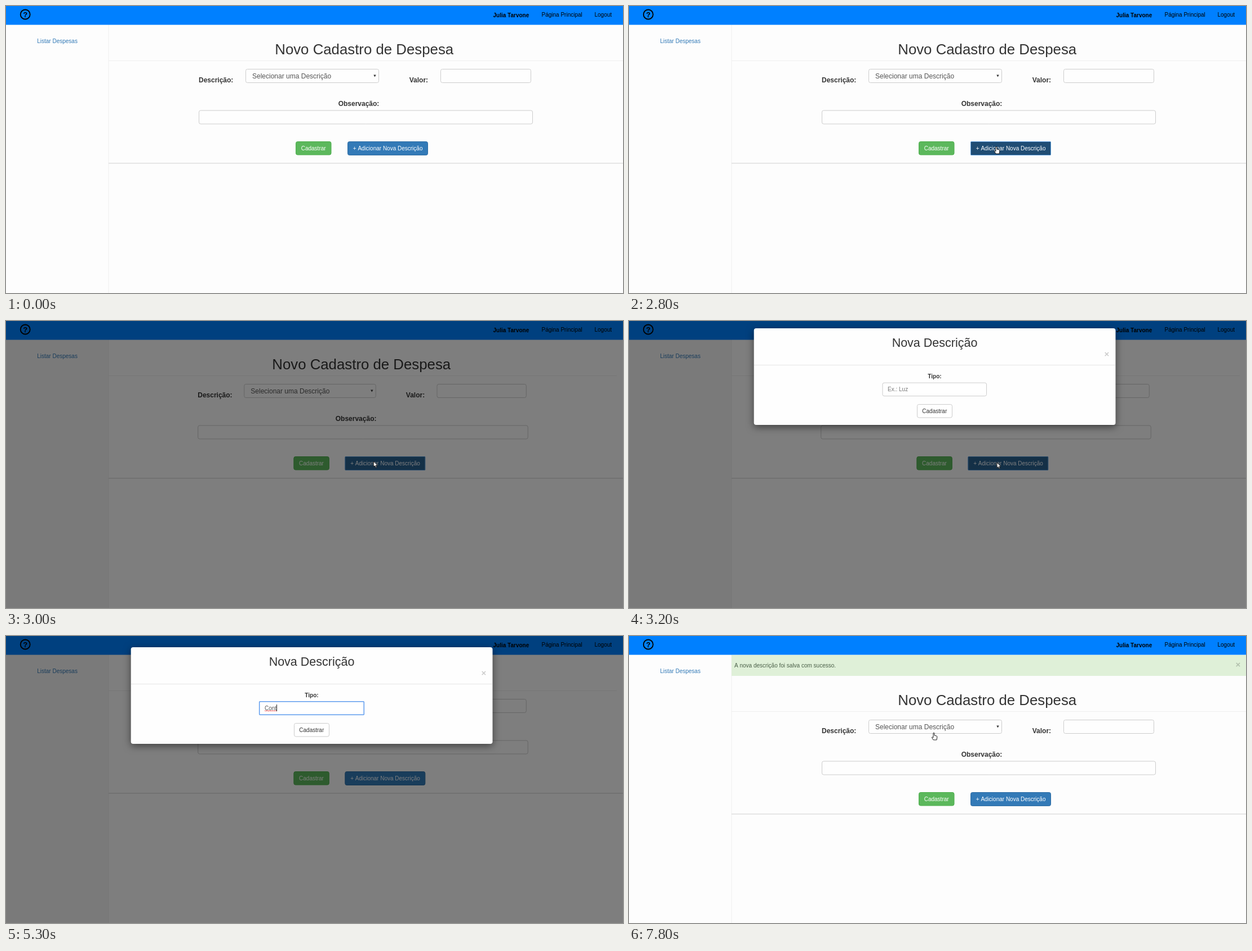
These frames come from a looping animation (1095x511 px, 8 s). An HTML page with a canvas:

```html
<!DOCTYPE html>
<html lang="pt-BR">
<head>
<meta charset="utf-8">
<title>Novo Cadastro de Despesa</title>
<style>
  html, body { margin: 0; width: 100%; height: 100%; overflow: hidden; background: #fdfdfd; }
  canvas { display: block; }
</style>
</head>
<body>
<canvas id="stage" width="1095" height="511"></canvas>
<script>
const W = 1095, H = 511, LOOP = 8000, STEP = 100;
const SIDE = 182;
const ctx = document.getElementById('stage').getContext('2d');
const SANS = '"Liberation Sans", Arial, sans-serif';

const ARROW = new Path2D('M0 0V9.5L2.2 7.5L3.8 11L5.3 10.3L3.8 7H6.8Z');
const HAND = new Path2D('M-1 1Q0-.7 1 1V5L5 6Q6 6.4 5.8 8L5 13H-.8L-3.7 8.6Q-3.4 7-1 8.8Z');

// Each run of the pointer: [time, x, y] points; it is hidden between runs.
const POINTER_RUNS = [
  { end: 1300, points: [[300, 56, 0], [700, 404, 116], [900, 404, 116], [1200, 541, 156]] },
  { end: 3600, points: [[1700, 545, 229], [2000, 652, 250], [2800, 652, 250], [2900, 652, 248],
                        [3100, 653, 252], [3200, 653, 252], [3500, 590, 145]] },
  { end: LOOP, points: [[6400, 541, 143], [6500, 545, 160], [6600, 545, 160], [6700, 541, 172]] }
];
const TYPED = [[4300, 'C'], [4700, 'Co'], [4900, 'Con'], [5300, 'Cont'], [5800, 'Conta']];

const clamp = v => Math.max(0, Math.min(1, v));
const between = (t, a, b) => t >= a && t < b;

function text(str, x, y, { size = 10, color = '#333', bold = false, align = 'left', family = SANS } = {}) {
  ctx.font = `${bold ? 'bold ' : ''}${size}px ${family}`;
  ctx.fillStyle = color;
  ctx.textAlign = align;
  ctx.fillText(str, x, y);
}

function rect(x, y, w, h, color) {
  ctx.fillStyle = color;
  ctx.fillRect(x, y, w, h);
}

function box(x, y, w, h, fill, border, radius = 3, line = 1) {
  ctx.beginPath();
  ctx.roundRect(x, y, w, h, radius);
  ctx.fillStyle = fill;
  ctx.fill();
  ctx.strokeStyle = border;
  ctx.lineWidth = line;
  ctx.stroke();
}

const field = (left, right, y) => box(left, y, right - left, 24, '#fefefe', '#ccc');
const closeMark = (x, y, color) => text('×', x, y, { size: 15, bold: true, color, align: 'center' });

function drawNav() {
  rect(0, 0, W, 33.5, '#0080ff');
  ctx.beginPath();
  ctx.arc(34.2, 15, 8.5, 0, Math.PI * 2);
  ctx.strokeStyle = '#000';
  ctx.lineWidth = 1.8;
  ctx.stroke();
  const color = '#000';
  text('?', 34.2, 19.5, { size: 13, bold: true, align: 'center', color });
  text('Julia Tarvone', 864.5, 20, { bold: true, color });
  text('Página Principal', 950.5, 19, { color });
  text('Logout', 1044.5, 19, { color });
}

function drawForm(t, narrow) {
  // The open dialog reserves scrollbar room, which squeezes the form.
  const X = x => narrow ? SIDE + (x - SIDE) * 0.989 : x;
  const label = { size: 12, bold: true };

  text('Novo Cadastro de Despesa', X(635.7), 85.5, { size: 25.8, align: 'center' });
  rect(SIDE, 97, (narrow ? 1084 : W) - SIDE, 1, '#eee');

  text('Descrição:', X(342), 135.5, label);
  field(X(425.5), X(661.5), 112.5);
  text('Selecionar uma Descrição', X(425.5) + 11.5, 128.5, { size: 12, color: '#555' });
  const tip = X(654.5);
  ctx.fillStyle = '#333';
  ctx.beginPath();
  ctx.moveTo(tip - 2.2, 122.5);
  ctx.lineTo(tip + 2.2, 122.5);
  ctx.lineTo(tip, 126.5);
  ctx.fill();

  text('Valor:', X(715.7), 135.5, label);
  field(X(771.5), X(931.5), 112.5);
  text('Observação:', X(626), 177.5, { ...label, align: 'center' });
  field(X(342.5), X(934.5), 186);

  const green = X(514.5), blue = X(606.5), white = { color: '#fff' };
  box(green, 241.5, 62.5, 23.5, '#5cb85c', '#4cae4c');
  text('Cadastrar', green + 9.2, 256.5, white);

  const focused = between(t, 2800, 3400);
  const pressed = between(t, 2800, 2900);
  const hovered = between(t, 1900, 3400);
  const fill = pressed ? '#204d74' : hovered ? '#286090' : '#337ab7';
  box(blue, 241.5, 142, 24, fill, focused ? '#5b9ddd' : hovered ? '#204d74' : '#2e6da4', focused ? 1 : 3);
  text('+ Adicionar Nova Descrição', blue + 9.3, 257, white);

  rect(SIDE, 279.3, W - SIDE, 1.4, '#ddd');
}

function drawPage(t, narrow, saved) {
  rect(0, 0, W, H, '#fdfdfd');
  if (narrow) rect(0, 33, SIDE, H, '#f5f5f5');
  rect(SIDE - 0.5, 33, 1, H, '#f0f0f0');
  drawNav();
  text('Listar Despesas', 55.2, 65.5, { color: '#337ab7' });
  ctx.save();
  if (saved) {
    rect(SIDE, 34, W - SIDE, 37, '#dff0d8');
    text('A nova descrição foi salva com sucesso.', 187, 56, { color: '#4a5f48' });
    closeMark(1081, 55.5, '#b2c0ad');
    ctx.translate(0, 37);
  }
  drawForm(t, narrow);
  ctx.restore();
}

function drawInput(t) {
  const focused = between(t, 3800, 6900);
  if (focused) box(449.7, 116.7, 185.6, 23.6, '#fff', '#5e9cee', 1, 1.5);
  else box(450, 117, 184.5, 23.5, '#fff', '#ccc');

  const typed = TYPED.reduce((last, [at, str]) => t >= at ? str : last, '');
  text(typed || 'Ex.: Luz', 459, 131.5, { color: typed ? '#555' : '#777' });

  const end = 459 + ctx.measureText(typed).width;
  if (between(t, 4400, 6300)) rect(Math.round(end), 122, 1, 12, '#222');
  if (typed === 'Cont') {
    ctx.beginPath();
    for (let x = 459, i = 0; x <= end; x += 1.4, i++) ctx.lineTo(x, i % 2 ? 134 : 132.6);
    ctx.strokeStyle = '#e33';
    ctx.lineWidth = 0.9;
    ctx.stroke();
  }
}

function drawModal(t) {
  const slide = clamp((t - 3000) / 300);
  ctx.save();
  ctx.globalAlpha = clamp((t - 3000) / 150);
  ctx.translate(0, -45 * (1 - slide) ** 1.7);

  ctx.save();
  ctx.shadowColor = 'rgba(0,0,0,.5)';
  ctx.shadowBlur = 14;
  ctx.shadowOffsetY = 3.6;
  ctx.fillStyle = '#fefefe';
  ctx.beginPath();
  ctx.roundRect(221.7, 20, 641.8, 172, 4);
  ctx.fill();
  ctx.restore();

  text('Nova Descrição', 542.5, 53, { size: 21.5, align: 'center' });
  closeMark(848, 71, '#ccc');
  rect(222, 85, 641, 1, '#e5e5e5');
  text('Tipo:', 542.5, 108.5, { bold: true, align: 'center' });
  drawInput(t);

  const hovered = t >= 6500;
  if (t >= 6900) box(510.7, 154.7, 63, 24.6, '#e6e6e6', '#5e9cee', 1, 1.5);
  else box(511.5, 155.5, 62, 23.5, hovered ? '#e6e6e6' : '#fff', hovered ? '#adadad' : '#ccc');
  text('Cadastrar', 520.3, 170.5);
  ctx.restore();
}

function drawStatus(t) {
  ctx.save();
  ctx.globalAlpha = clamp((7800 - t) / 300);
  ctx.fillStyle = '#292929';
  ctx.beginPath();
  ctx.roundRect(0, 497, 363.5, 14, [0, 2, 0, 0]);
  ctx.fill();
  text('Aguardando localhost...', 2.5, 507.5, { size: 8.2, color: '#c8c8c8', family: '"Open Sans", sans-serif' });
  ctx.restore();
}

function drawPointer(t) {
  const run = POINTER_RUNS.find(r => between(t, r.points[0][0], r.end));
  if (!run) return;
  const pts = run.points;
  const next = pts.findIndex(p => p[0] > t);
  let [, x, y] = pts[pts.length - 1];
  if (next > 0) {
    const [t0, x0, y0] = pts[next - 1], [t1, x1, y1] = pts[next];
    const k = (t - t0) / (t1 - t0);
    x = x0 + (x1 - x0) * k;
    y = y0 + (y1 - y0) * k;
  }
  const shape = between(t, 1900, 2900) || t >= 6500 ? HAND : ARROW;
  ctx.save();
  ctx.translate(x, y);
  ctx.lineWidth = 1;
  ctx.strokeStyle = '#222';
  ctx.fillStyle = '#fff';
  ctx.fill(shape);
  ctx.stroke(shape);
  ctx.restore();
}

function draw(t) {
  const dialog = between(t, 2900, 7400);
  drawPage(t, dialog, t >= 7400);
  if (dialog) {
    rect(0, 0, W, H, `rgba(0,0,0,${t < 3000 ? 0.22 : 0.5})`);
    if (t >= 3000) drawModal(t);
  }
  if (between(t, 7300, 7800)) drawStatus(t);
  drawPointer(t);
}

function tick() {
  draw(Math.floor(performance.now() % LOOP / STEP) * STEP);
  requestAnimationFrame(tick);
}
tick();
</script>
</body>
</html>
```
